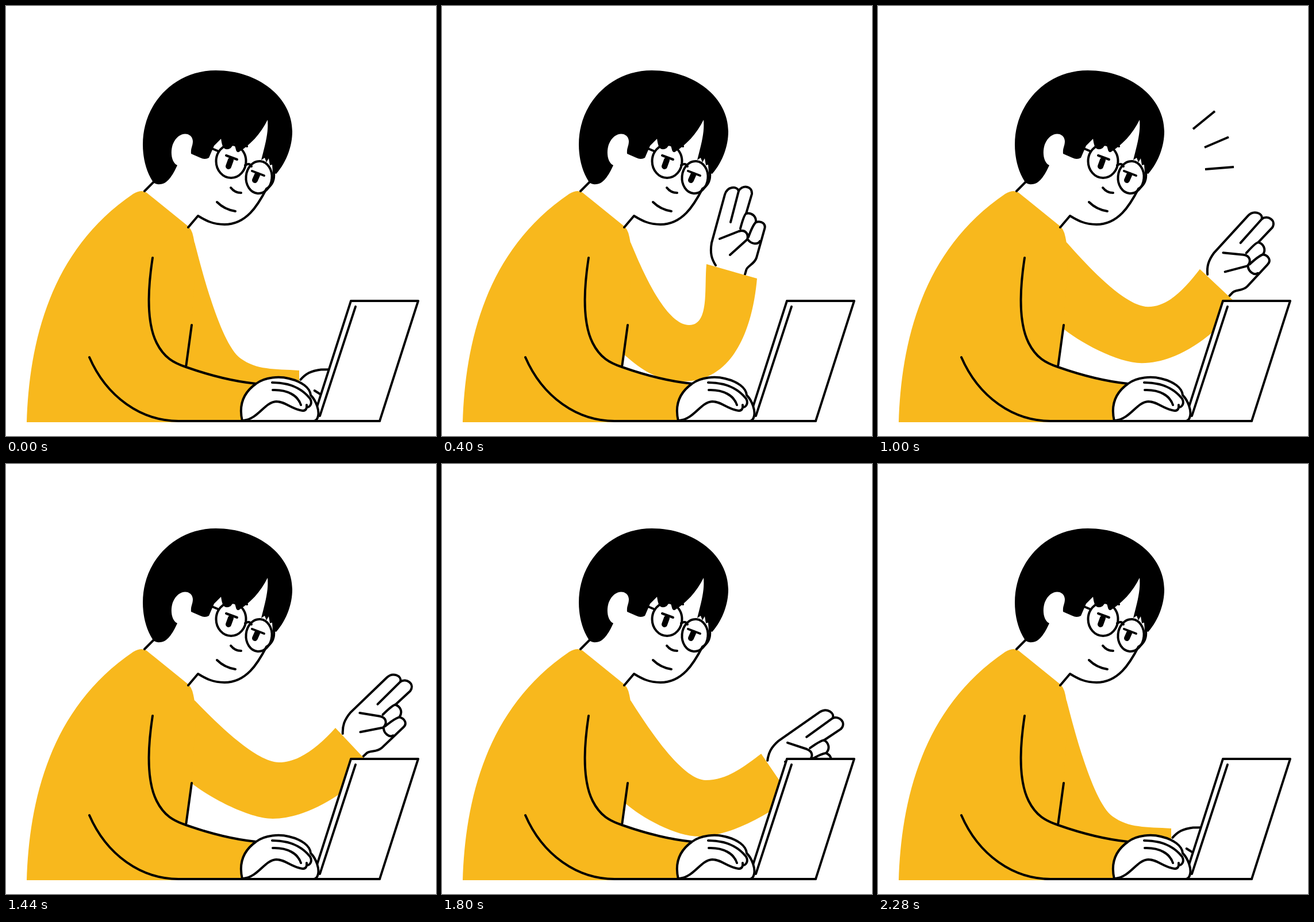
An HTML page that plays this animation: 748x748 px, repeating every 3 s.

```html
<!DOCTYPE html>
<html lang="en">
<head>
<meta charset="utf-8">
<title>Working at a laptop</title>
<style>
  html, body { margin: 0; height: 100%; overflow: hidden; background: #fff; }
  svg { display: block; width: 100vw; height: 100vh; }
  path, ellipse { fill: none; stroke: #000; stroke-width: 4; stroke-linecap: round; stroke-linejoin: round; }
  .yellow { fill: #f8b81d; stroke: none; }
  .black { fill: #000; stroke: none; }
  .white { fill: #fff; }
  .pupil { stroke-width: 10; }
  #burst { stroke-linecap: butt; }
</style>
</head>
<body>
<svg viewBox="0 0 748 748">
  <path id="burst"/>

  <g id="hand">
    <path class="white" d="M476 451 C469 440 466 430 469 412 L492 328 C496 314 513 312 516 322 C521 311 540 312 539 327 L529 361 C538 359 547 365 546 376 C556 373 564 379 561 388 L547 438 C543 450 530 452 529 460 L527 467"/>
    <path d="M516 322 L502 376 M529 361 C525 364 522 376 519 387 M546 376 C542 380 537 391 533 402 M553 409 C549 416 537 414 532 406 M483 405 L516 392 C527 388 534 396 531 406 L501 433"/>
  </g>
  <path id="sleeve" class="yellow"/>

  <!-- laptop -->
  <path class="white" d="M600 513 H717 L650 722 H533 Z"/>
  <path d="M608 523 L546 713"/>

  <!-- body and near arm -->
  <path class="yellow" d="M36 724 C40 595 72 428 221 327 Q236 318 245 325 L313 380 Q323 386 326 402 L331 428 L323 555 L313 628 C350 641 395 653 435 657 L440 724 Z"/>
  <path d="M255 438 C247 490 244 550 262 586 C275 612 292 621 313 628 C350 641 395 653 435 657 M323 555 L313 628 M145 611 C175 680 235 722 300 722 H650"/>

  <!-- near hand -->
  <path class="white" d="M411 722 C404 692 415 671 435 657 C451 645 476 644 492 648 C514 653 529 664 530 677 C540 687 545 704 543 713 Q541 722 535 722 Z"/>
  <path d="M463 655 C492 655 514 664 529 683 C533 690 530 698 523 698 M464 668 C490 667 508 678 513 694 M523 694 Q524 704 516 704 C496 701 486 688 470 688 C450 689 438 719 413 721"/>

  <!-- head -->
  <path class="black" d="M255 305 C236 275 235 235 242 208 C254 158 300 112 365 112 C440 112 498 160 498 218 C498 248 485 275 470 292 L464 290 L463 276 L459 277 L457 265 L453 272 L450 264 L444 268 C451 240 457 220 455 198 C443 223 424 242 405 254 Q401 255 400 250 L397 239 L391 247 Q385 251 380 248 Q376 246 374 231 L362 243 L353 264 Q346 268 338 264 L322 257 C321 247 325 244 325 235 C324 219 300 216 290 241 C285 257 289 273 298 277 C290 295 280 310 268 310 Q259 311 255 305 Z"/>
  <path d="M257 306 L241 322 M317 385 L334 365 C347 373 360 380 380 380 C418 380 438 347 453 318 Q468 309 466 290 M356 247 L368 252 M417 243 L419 244"/>
  <ellipse cx="391.500" cy="270" rx="26" ry="29"/>
  <ellipse cx="440" cy="298" rx="22.500" ry="28" transform="rotate(5 440 298)"/>
  <path d="M416 277 Q423 272 427 279 M383 260 L402 267 M428 287 L449 295 M391 316 Q398 325 409 325 M367 341 Q380 354 399 357"/>
  <path class="pupil" d="M391 268 L387 279 M437 294 L433 303"/>
</svg>

<script>
const get = id => document.getElementById(id);
const clamp = x => Math.min(1, Math.max(0, x));
const mix = (a, b, k) => a.map((v, i) => v + (b[i] - v) * k);
const rad = deg => deg * Math.PI / 180;

// Cuff x, y; hand angle; inner elbow x, y; slope of the sleeve at the elbow
const REST = [510, 634, 74, 408, 613, 36];
const RAISED = [460, 449, 0, 430, 555, 0];
const FORWARD = [573, 459, 30.8, 475, 519, 0];
const LOWERING = [535, 555, 50, 440, 585, 0];

const inOut = u => u < .5 ? (2 * u) ** 1.5 / 2 : 1 - (2 - 2 * u) ** 1.5 / 2;
const decay = u => (1 - Math.exp(-2.5 * u)) / (1 - Math.exp(-2.5));

function poseAt(t) {
  if (t < 680) return mix(REST, RAISED, inOut(clamp(t / 400)));
  if (t < 1560) return mix(RAISED, FORWARD, decay(clamp((t - 680) / 480)));
  const k = inOut(clamp((t - 1560) / 720)), mid = inOut(400 / 720);
  return k < mid ? mix(FORWARD, LOWERING, k / mid)
                 : mix(LOWERING, REST, (k - mid) / (1 - mid));
}

// Both sleeve edges follow from the shoulder, the elbow and the cuff
function drawArm([x, y, turn, ex, ey, slope]) {
  const from = ([px, py], length, deg) =>
    [px + length * Math.cos(rad(deg)), py + length * Math.sin(rad(deg))];
  const shoulder = [328, 411], elbow = [ex, ey], cuff = [x, y];
  const forearm = 95 + turn * 1.2;

  const before = from(elbow, -42, slope);
  const upper = [mix(shoulder, before, .3), before, elbow,
                 from(elbow, 35, slope), from(cuff, 44, forearm), cuff];

  const [cx, cy] = from(cuff, 91.5, turn + 15.9);
  const hem = [cx, Math.min(716, cy)];
  const under = [ex - 11, ey + 98];
  const armpit = [318, under[1] - .45 * (under[0] - 318)];
  const lower = [from(hem, 66, forearm), from(under, 98 - 1.3 * turn, 0), under,
                 from(under, -42, 0), from(armpit, 40, 41), armpit];

  get('sleeve').setAttribute('d', `M${shoulder} C${upper} L${hem} C${lower} L290 500 Z`);
  get('hand').setAttribute('transform',
    `translate(${x} ${y}) rotate(${turn}) translate(-460 -449)`);
}

function drawBurst(t) {
  const shift = 9 * (Math.min(t, 1160) - 1000) / 160;
  const line = ([x, y, dx, dy]) => {
    const k = shift / Math.hypot(dx, dy);
    return `M${x + dx * k} ${y + dy * k} l${dx} ${dy}`;
  };
  const lines = [[548, 214, 38, -31], [568, 246, 42, -18], [569, 284, 50, -4]];
  get('burst').setAttribute('d', t >= 920 && t < 1440 ? lines.map(line).join(' ') : '');
}

function frame() {
  const t = Math.floor(performance.now() % 3000 / 40) * 40;
  drawArm(poseAt(t));
  drawBurst(t);
  requestAnimationFrame(frame);
}
frame();
</script>
</body>
</html>
```
